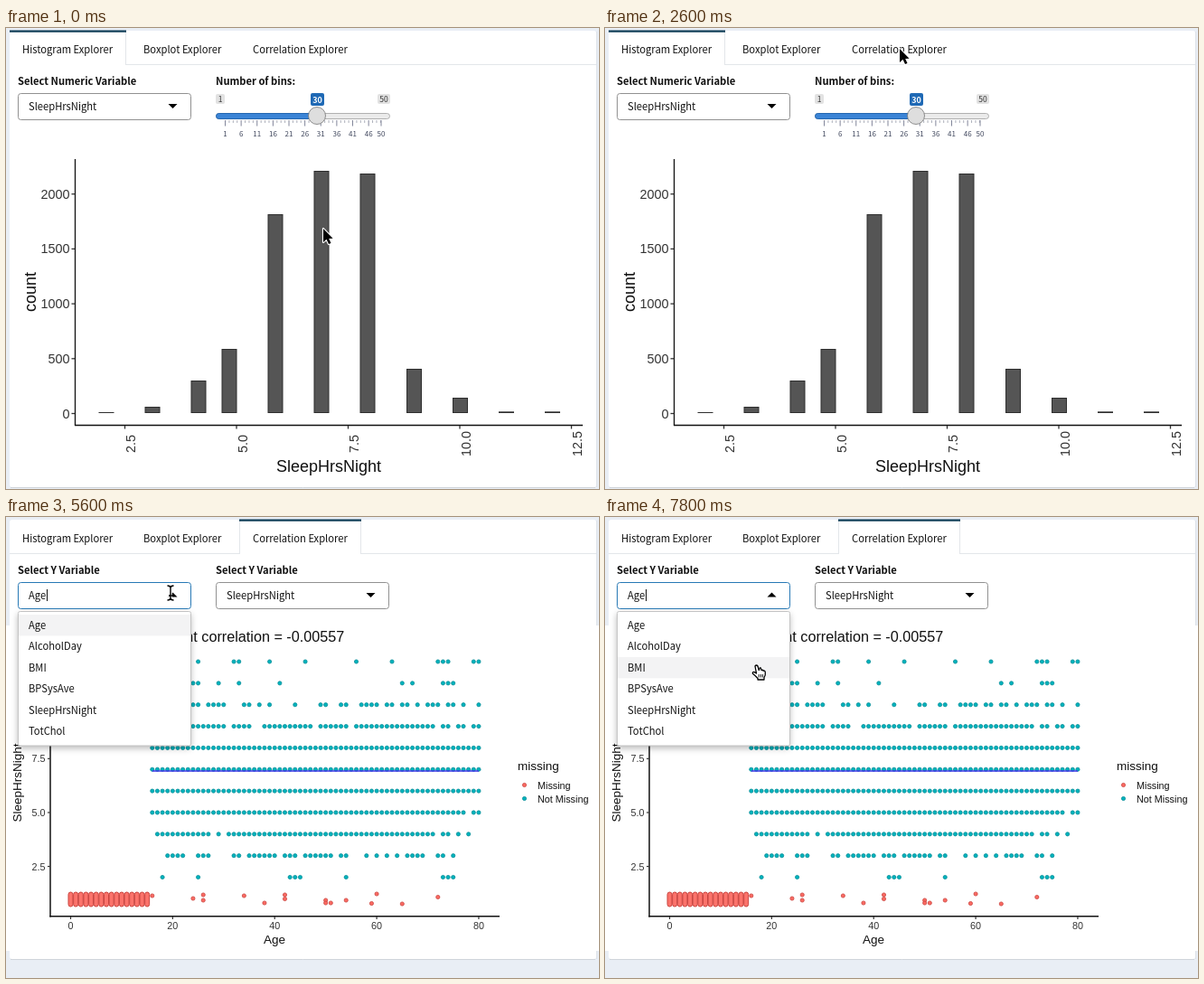
Animation, 656 px wide and 510 px high, one loop 8 s. Source, as an HTML page with a canvas:

```html
<!DOCTYPE html>
<html lang="en">
<head>
<meta charset="utf-8">
<title>Variable explorer</title>
<style>
  html, body { margin: 0; width: 100%; height: 100%; overflow: hidden; background: #fff; }
  canvas { display: block; }
</style>
</head>
<body>
<canvas id="stage" width="656" height="510"></canvas>
<script>
const c = document.getElementById('stage').getContext('2d');
const LOOP = 8000, STEP = 200;
const SWITCH_AT = 3200, OPEN_AT = 5400;
const UI = '"Noto Sans CJK JP", "Noto Sans CJK SC", "Noto Sans CJK", sans-serif';
const PLOT = '"Liberation Sans", Arial, sans-serif';
const BG = '#e9eef5', INK = '#111', RULE = '#e3e6ea';

// ---------- helpers ----------
function rect(x, y, w, h, fill) {
  c.fillStyle = fill;
  c.fillRect(x, y, w, h);
}
function round(x, y, w, h, r, fill, stroke) {
  c.beginPath();
  c.roundRect(x, y, w, h, r);
  if (fill) { c.fillStyle = fill; c.fill(); }
  if (stroke) { c.strokeStyle = stroke; c.lineWidth = 1; c.stroke(); }
}
function line(x1, y1, x2, y2, color = INK, width = 1) {
  c.beginPath();
  c.moveTo(x1, y1);
  c.lineTo(x2, y2);
  c.strokeStyle = color;
  c.lineWidth = width;
  c.stroke();
}
function text(s, x, y, font, color = INK, align = 'left') {
  c.font = font;
  c.fillStyle = color;
  c.textAlign = align;
  c.fillText(s, x, y);
}
function textUp(s, x, y, font, color) {
  c.save();
  c.translate(x, y);
  c.rotate(-Math.PI / 2);
  text(s, 0, 0, font, color, 'center');
  c.restore();
}
function poly(points, fill, stroke, width = 1) {
  c.beginPath();
  points.forEach(([x, y]) => c.lineTo(x, y));
  c.closePath();
  c.lineJoin = 'round';
  if (stroke) { c.strokeStyle = stroke; c.lineWidth = width; c.stroke(); }
  if (fill) { c.fillStyle = fill; c.fill(); }
}
function dot(x, y, r, fill, stroke) {
  c.beginPath();
  c.arc(x, y, r, 0, 7);
  c.fillStyle = fill;
  c.fill();
  c.strokeStyle = stroke;
  c.lineWidth = 0.8;
  c.stroke();
}
const ui = (size = 11.2) => `${size}px ${UI}`;
const bold = (size = 11.2) => `bold ${size}px ${UI}`;
const plot = size => `${size}px ${PLOT}`;

// ---------- page frame ----------
const TABS = [
  { name: 'Histogram Explorer', x: 18, left: 4, right: 133 },
  { name: 'Boxplot Explorer', x: 152 },
  { name: 'Correlation Explorer', x: 273, left: 258, right: 393 }
];
function page(active, bottom) {
  rect(0, 0, 656, 510, BG);
  round(4, 3, 649, bottom - 3, 3, '#fff');
  line(5, bottom + 0.5, 652, bottom + 0.5, '#cfd4da');
  line(653.5, 4, 653.5, bottom, '#dce1e8');
  const { left, right } = TABS[active];
  if (left > 4) {
    line(4, 40.5, left, 40.5, RULE);
    line(left + 0.5, 4, left + 0.5, 41, RULE);
  }
  line(right, 40.5, 653, 40.5, RULE);
  line(right - 0.5, 4, right - 0.5, 41, RULE);
  rect(left, 2.5, right - left, 2.2, '#0c3b55');
  TABS.forEach(t => text(t.name, t.x, 28, ui()));
}
function select(x, value, open) {
  round(x + 0.5, 72.5, 191, 29, 3, '#fff', open ? '#2779b5' : '#919191');
  text(value, x + 12, 91, ui());
  const tip = x + 171.5;
  poly(open ? [[tip - 5, 88.5], [tip, 83.5], [tip + 5, 88.5]]
            : [[tip - 5, 84], [tip, 89], [tip + 5, 84]], '#000');
  if (open) line(45.5, 80, 45.5, 93, '#111');
}

// ---------- slider ----------
function slider() {
  const tickX = v => 242.5 + (v - 1) * 3.525;
  text('Number of bins:', 232, 63, bold());
  round(232, 73, 10, 11, 2, '#e2e2e2');
  text('1', 237, 81.5, ui(8.5), '#333', 'center');
  round(411, 73, 14, 11, 2, '#e2e2e2');
  text('50', 418, 81.5, ui(8.5), '#333', 'center');
  round(337, 72, 15, 14, 2, '#1f69b5');
  text('30', 344.5, 82.5, bold(9), '#fff', 'center');
  round(232.5, 94.5, 192, 6, 3, '#ebebeb', '#b0b0b0');
  round(232.5, 94.5, 112, 6, 3, '#3b84d6', '#2467b0');
  for (let i = 0; i <= 39; i++) {
    const x = tickX(1 + i * 1.25);
    line(x, 102, x, i % 4 ? 105 : 108.5, i % 4 ? '#a5a9b5' : '#74798f', 0.9);
  }
  for (let v = 1; v < 51; v += 5) text(v, tickX(v), 120, ui(8), '#41485e', 'center');
  line(415, 102, 415, 108.5, '#74798f', 0.9);
  text('50', 415, 120, ui(8), '#41485e', 'center');
  dot(344, 97, 9.5, '#dedede', '#777');
}

// ---------- histogram ----------
const BARS = [[111, 425], [162, 419], [213, 390], [247, 355], [298, 206], [349, 158],
  [400, 161], [451.5, 377], [502.5, 409], [553.5, 424.3], [604.5, 424.3]];
function histogram() {
  page(0, 508);
  text('Select Numeric Variable', 13, 63, bold());
  select(13, 'SleepHrsNight');
  slider();
  for (const [x, top] of BARS) {
    const h = 426 - top;
    rect(x - 8.5, top, 17, h, '#2e2e2e');
    if (h > 4) rect(x - 7.5, top + 1, 15, h - 2, '#555');
  }
  line(76.5, 145, 76.5, 440, INK, 1.3);
  line(76, 439.5, 638, 439.5, INK, 1.3);
  for (let i = 0; i < 5; i++) {
    const y = 426.5 - i * 60.7, x = 131.5 + i * 123.5;
    line(72.5, y, 76, y, '#333', 1.3);
    text(i * 500, 70.5, y + 5, plot(14.4), '#333', 'right');
    line(x, 440, x, 443.5, '#333', 1.3);
    textUp((2.5 + i * 2.5).toFixed(1), x + 11.5, 460, plot(14.4), '#333');
  }
  text('SleepHrsNight', 357, 491, plot(18), INK, 'center');
  textUp('count', 33, 292, plot(18));
}

// ---------- scatter ----------
// Ages present at each sleep value, as ranges.
const ROWS = {
  12: '16 19 25 32-33 39 46 56 63 72-74 79-80',
  11: '16 18 20 23-25 29 33 41 65 67 73-75',
  10: '16-25 27-30 34-35 37 39 44 49-50 53-54 57-60 62-63 65-66 68 70-72 74-75 77 80',
  9: '16-30 32-35 38-47 49-54 56-71 73-74 76-77 79-80',
  8: '16-80', 7: '16-80', 6: '16-80',
  5: '16-77 79-80',
  4: '17-27 29 31-71 73-74 76 78',
  3: '19-22 25-27 32-33 35-40 42-44 46-51 53-54 58 60 62 64 66-69 72-73 75',
  2: '18 25 43-45 54 73-75'
};
const STRAYS = [[16, 419], [24, 422], [26, 418], [26, 424], [34, 419], [38, 427], [42, 418],
  [42, 422.5], [50, 424], [50, 427], [51, 427], [54, 424], [59, 427.5], [60, 417], [65, 428], [72, 420.5]];
const TEAL = ['#00b3bd', '#078d97'], RED = ['#fb6a62', '#c9443f'];
const ageX = a => 71.5 + a * 5.643;
const sleepY = v => 446.2 - v * 23.85;

function scatter(open) {
  page(2, 489);
  rect(0, 120, 656, 360, '#fff');
  text('Select Y Variable', 13, 63, bold());
  text('Select Y Variable', 232, 63, bold());
  select(13, 'Age', open);
  select(232, 'SleepHrsNight');

  text('Age vs. SleepHrsNight correlation = -0.00557', 49, 138, plot(16.2));
  for (const [v, spec] of Object.entries(ROWS)) {
    for (const part of spec.split(' ')) {
      const [from, to = from] = part.split('-').map(Number);
      for (let a = from; a <= to; a++) dot(ageX(a), sleepY(v), 2.1, ...TEAL);
    }
  }
  line(ageX(16), 281, ageX(80), 281, '#3b35e6', 1.7);
  for (let a = 0; a < 16; a++) round(ageX(a) - 2.5, 415, 5, 16, 2.5, '#fb736b', RED[1]);
  STRAYS.forEach(([a, y]) => dot(ageX(a), y, 2.1, ...RED));

  line(49, 147, 49, 442.5, INK, 1.5);
  line(48.3, 441.7, 546, 441.7, INK, 1.5);
  for (let i = 0; i < 5; i++) {
    const v = 2.5 + i * 2.5, y = sleepY(v), x = ageX(i * 20);
    line(46, y, 49, y, '#333', 1.2);
    text(v.toFixed(1), 43.5, y + 4, plot(10.8), '#333', 'right');
    line(x, 442, x, 445, '#333', 1.2);
    text(i * 20, x, 456, plot(10.8), '#333', 'center');
  }
  text('Age', 297, 472, plot(13.5), INK, 'center');
  textUp('SleepHrsNight', 17, 294, plot(13.5));

  text('missing', 566, 280, plot(13.5));
  dot(573.5, 296.5, 2.1, ...RED);
  text('Missing', 588, 300.5, plot(10.8));
  dot(573.5, 311.5, 2.1, ...TEAL);
  text('Not Missing', 588, 315.5, plot(10.8));
}

const ITEMS = ['Age', 'AlcoholDay', 'BMI', 'BPSysAve', 'SleepHrsNight', 'TotChol'];
const ITEM_TOP = 108, ITEM_H = 23.45;
function menu(pointerY) {
  const hover = Math.max(0, Math.min(5, Math.floor((pointerY - ITEM_TOP) / ITEM_H)));
  c.save();
  c.shadowColor = 'rgba(0,0,0,.28)';
  c.shadowBlur = 7;
  c.shadowOffsetY = 3;
  round(13, 104, 191.5, 149, 2, '#fff');
  c.restore();
  round(13.5, 104.5, 191, 148.5, 2, '#fff', '#c4c4c4');
  rect(14, ITEM_TOP + hover * ITEM_H, 190, ITEM_H, '#f3f3f4');
  ITEMS.forEach((s, i) => text(s, 25, 124 + i * ITEM_H, ui()));
}

// ---------- pointer ----------
const PATH = [[0, 351, 222], [200, 351, 222], [1000, 333, 175], [2400, 326, 23], [3400, 326, 23],
  [4400, 267, 65], [5200, 182, 84], [5600, 182, 84], [6600, 172, 118], [7600, 168, 164], [8000, 168, 164]];
function pointerAt(t) {
  const i = PATH.findIndex(p => p[0] > t);
  const [t0, x0, y0] = PATH[i - 1], [t1, x1, y1] = PATH[i];
  const u = (t - t0) / (t1 - t0), e = u * u * (3 - 2 * u);
  return [x0 + (x1 - x0) * e, y0 + (y1 - y0) * e];
}
function arrow() {
  poly([[0, 0], [0, 15], [3.5, 11.8], [6, 17], [8.5, 16], [6.2, 11], [10.6, 10.8]], '#000', '#fff', 2.2);
}
function beam() {
  const d = new Path2D('M-3.5-8Q0-8 0-5.5Q0-8 3.5-8M0-6V6M-3.5 8Q0 8 0 5.5Q0 8 3.5 8M-2 3H2');
  c.strokeStyle = '#fff';
  c.lineWidth = 3;
  c.stroke(d);
  c.strokeStyle = '#000';
  c.lineWidth = 1.4;
  c.stroke(d);
}
function hand() {
  const d = new Path2D('M-2 1Q-.5-1 1 1L2.3 5.5Q4-.2+5 5.5Q6.5 4.5 7 6.2Q9 5.4 9.3 8' +
    'Q9.8 11 8 13.5V16H1V14.5Q-1.5 11.5-4.6 9.2Q-5 7-2.8 7.6L-.5 9Z');
  c.fillStyle = '#fff';
  c.fill(d);
  c.strokeStyle = '#000';
  c.lineWidth = 1.3;
  c.lineJoin = 'round';
  c.stroke(d);
  [2.2, 4.4, 6.4].forEach(x => line(x, 10, x, 13.5, '#000', 0.9));
}

function draw(t) {
  const [x, y] = pointerAt(t), open = t >= OPEN_AT;
  if (t < SWITCH_AT) histogram();
  else scatter(open);
  if (open) menu(y);
  c.save();
  c.translate(x, y);
  if (open && y > 104) hand();
  else if (t >= 5200) beam();
  else arrow();
  c.restore();
}
function tick(now) {
  draw(Math.floor((now % LOOP) / STEP) * STEP);
  requestAnimationFrame(tick);
}
draw(0);
requestAnimationFrame(tick);
</script>
</body>
</html>
```
